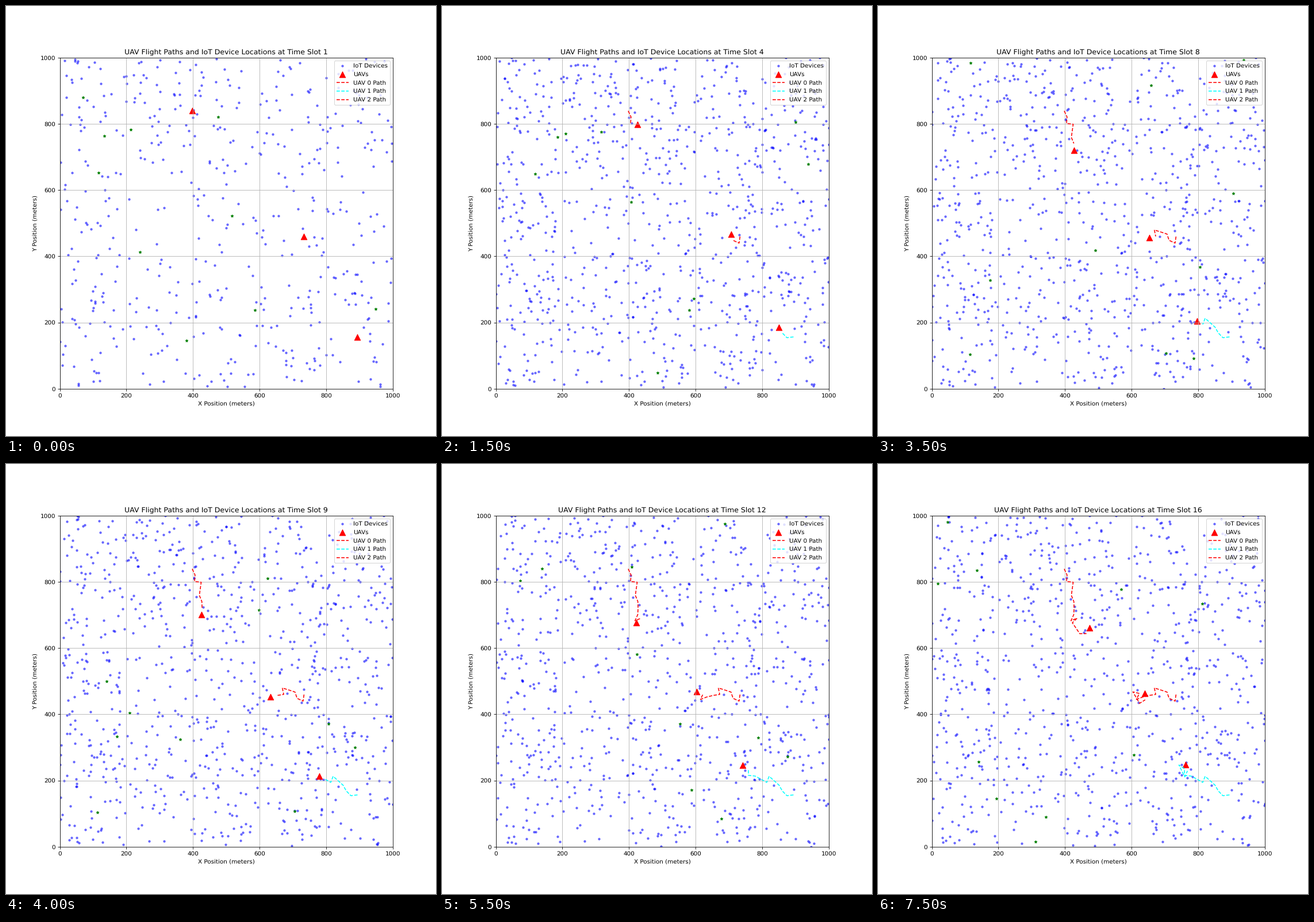
A matplotlib script that plays this animation: 748 by 748 pixels, repeating every 8000 ms.

```python
import numpy as np
import matplotlib.pyplot as plt
from matplotlib.animation import FuncAnimation

AREA, SLOTS, INTERVAL = 1000, 16, 500
START_COUNT, FULL_COUNT = 500, 900
STEP, DRIFT = 20, 5          # meters per slot: UAV flight, device jitter
PICKS, SWAP_CHANCE = 10, 0.5

# Path color, start position, heading of each step in degrees
FLIGHTS = [
    ("red", (397.5, 839), [-65, -94, -6, -98, -98, -68, -88, -93,
                           -114, 23, -136, -56, -56, 1, 64]),
    ("cyan", (893.5, 156.5), [187, 134, 119, 138, 138, -111, 150, 152,
                              174, 90, 146, -64, -64, 66, 106]),
    ("red", (733, 459.5), [-98, 155, 108, 162, 162, -78, 189, 194,
                           201, 64, 166, -60, -60, 32, 95]),
]


def fly(start, headings):
    """Positions of a UAV that covers the same distance in every slot."""
    angles = np.radians(headings)
    steps = STEP * np.column_stack([np.cos(angles), np.sin(angles)])
    return np.cumsum(np.vstack([start, steps]), axis=0)


def drift(rng):
    """Device positions per slot: a small random walk inside the area."""
    spots = rng.uniform(0, AREA, (FULL_COUNT, 2))
    walk = []
    for _ in range(SLOTS):
        walk.append(spots)
        spots = np.clip(spots + rng.uniform(-DRIFT, DRIFT, spots.shape),
                        0, AREA)
    return walk


def select(rng):
    """Starred device indices per slot; about half are swapped each time."""
    chosen = rng.integers(0, START_COUNT, PICKS)
    history = []
    for _ in range(SLOTS):
        history.append(chosen)
        swap = rng.random(PICKS) < SWAP_CHANCE
        chosen = np.where(swap, rng.integers(0, START_COUNT, PICKS), chosen)
    return history


rng = np.random.default_rng(12)
walk = drift(rng)
picks = select(rng)
routes = [fly(start, headings) for _, start, headings in FLIGHTS]

plt.rcParams["text.hinting"] = "none"
fig, ax = plt.subplots(figsize=(10, 10), dpi=74.8)
devices = ax.scatter([], [], s=10, c="blue", alpha=0.5, label="IoT Devices")
stars = ax.scatter([], [], s=20, c="green", marker="*")
uavs = ax.scatter([], [], s=100, c="red", marker="^", label="UAVs")
paths = [ax.plot([], [], "--", color=color, label=f"UAV {i} Path")[0]
         for i, (color, *_) in enumerate(FLIGHTS)]
ticks = range(0, AREA + 1, 200)
ax.set(xlim=(0, AREA), ylim=(0, AREA), xticks=ticks, yticks=ticks,
       xlabel="X Position (meters)", ylabel="Y Position (meters)")
ax.grid(True)
ax.legend(loc="upper right")
title = ax.set_title("")


def update(i):
    count = START_COUNT if i == 0 else FULL_COUNT
    devices.set_offsets(np.delete(walk[i][:count], picks[i], axis=0))
    stars.set_offsets(walk[i][picks[i]])
    uavs.set_offsets([route[i] for route in routes])
    for path, route in zip(paths, routes):
        path.set_data(route[:i, 0], route[:i, 1])
    title.set_text("UAV Flight Paths and IoT Device Locations "
                   f"at Time Slot {i + 1}")
    return [devices, stars, uavs, title, *paths]


anim = FuncAnimation(fig, update, frames=SLOTS, interval=INTERVAL,
                     repeat=True, repeat_delay=0, blit=False)
plt.show()
```
